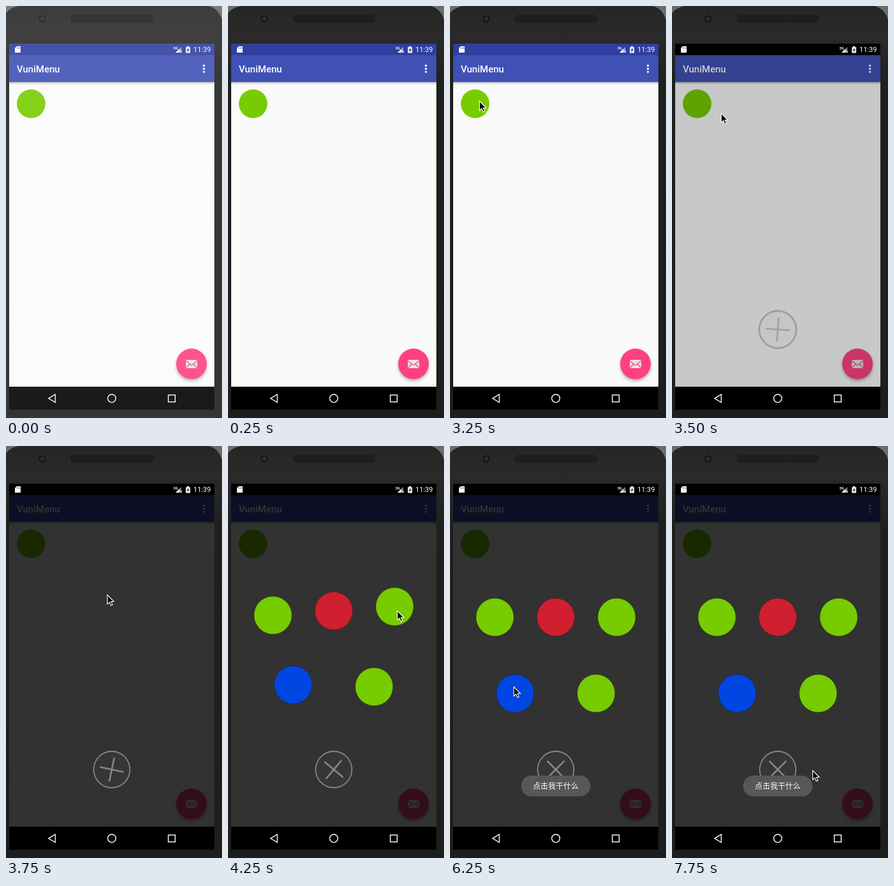
Write an HTML page that moves like this. It is 340 px wide and 645 px high and loops after 8000 ms.

```html
<!DOCTYPE html>
<html lang="en">
<head>
<meta charset="utf-8">
<title>Menu demo</title>
<style>
  html, body { margin: 0; width: 100%; height: 100%; overflow: hidden; background: #222; }
  svg { display: block; width: 340px; height: 645px; }
  text { font-family: Roboto, "Noto Sans CJK SC", "Noto Sans CJK", sans-serif; fill: #fff; }
</style>
</head>
<body>
<svg viewBox="0 0 340 645">
  <defs>
    <linearGradient id="body" x1="0" y1="0" x2="0" y2="1">
      <stop offset="0" stop-color="#262626"/>
      <stop offset=".07" stop-color="#2a2a2a"/>
      <stop offset=".2" stop-color="#1f1f1f"/>
      <stop offset="1" stop-color="#1e1e1e"/>
    </linearGradient>
    <linearGradient id="barShadow" x1="0" y1="0" x2="0" y2="1">
      <stop offset="0" stop-opacity=".26"/>
      <stop offset="1" stop-opacity="0"/>
    </linearGradient>
    <pattern id="mesh" width="3" height="3" patternUnits="userSpaceOnUse">
      <rect width="3" height="3" fill="#252525"/>
      <circle cx="1.5" cy="1.5" r=".9" fill="#0e0e0e"/>
    </pattern>
    <filter id="blur" x="-30%" y="-30%" width="160%" height="160%">
      <feGaussianBlur stdDeviation="2.4"/>
    </filter>
    <clipPath id="window"><rect x="5" y="77" width="323" height="519"/></clipPath>
  </defs>

  <!-- phone -->
  <rect width="340" height="645" fill="#6c6c6c"/>
  <path d="M0 11Q6 3 20 0H319Q335 4 340 22V645H0Z" fill="url(#body)"/>
  <circle cx="57" cy="20" r="6" fill="#191919"/>
  <circle cx="57" cy="20" r="3" fill="#2b3038"/>
  <rect x="102.500" y="14" width="129" height="11.500" rx="5.500" fill="url(#mesh)" stroke="#181818"/>

  <!-- app -->
  <rect x="5" y="59" width="323" height="573" fill="#fafafa"/>
  <rect id="status" x="5" y="59" width="323" height="18" fill="#303f9f"/>
  <rect x="5" y="77" width="323" height="42" fill="#3f51b5"/>
  <rect x="5" y="119" width="323" height="4" fill="url(#barShadow)"/>
  <text x="17" y="104" font-size="15" font-weight="500">VuniMenu</text>
  <g fill="#fff">
    <circle cx="311.500" cy="93.300" r="1.700"/>
    <circle cx="311.500" cy="98.200" r="1.700"/>
    <circle cx="311.500" cy="103.100" r="1.700"/>
  </g>
  <circle cx="39.500" cy="153" r="22.500" fill="#76cc00"/>
  <circle cx="292" cy="563" r="24" opacity=".3" filter="url(#blur)"/>
  <circle cx="292" cy="560.300" r="24" fill="#ff4081"/>
  <rect x="283" y="554" width="18" height="13" rx="1.300" fill="#e8e4e4"/>
  <path d="M283 555.500L292 562.500L301 555.500M283.500 566.500L289 560.500M300.500 566.500L295 560.500" fill="none" stroke="#ff4081" stroke-width="1.200"/>

  <!-- status icons -->
  <path d="M17 63H23V73H14V66Z" fill="#fff"/>
  <path d="M17.500 64.500V67M19.500 64.500V67M21.500 64.500V67" stroke="#303f9f" stroke-width=".8"/>
  <text x="263.500" y="67.500" font-size="5.500" font-weight="700">3G</text>
  <path d="M276 64V73H267Z" fill="#fff" opacity=".5"/>
  <path d="M273 67V73H267Z" fill="#fff"/>
  <path d="M274 70L277 73M277 70L274 73" stroke="#fff"/>
  <path d="M283 64.500H285V63H288V64.500H290V73.500H283Z" fill="#fff"/>
  <path d="M287.800 65L284 69.700H286L285.200 72.800L289.200 68H287Z" fill="#303f9f"/>
  <text x="295" y="72" font-size="11">11:39</text>

  <!-- navigation -->
  <rect x="5" y="596" width="323" height="36"/>
  <g fill="none" stroke="#fff" stroke-width="1.400">
    <path d="M67 614.300L77.500 608V620.600Z"/>
    <circle cx="166.500" cy="614.300" r="6.300"/>
    <rect x="255.500" y="609" width="10.800" height="10.800"/>
  </g>

  <rect id="dim" x="5" y="77" width="323" height="519"/>
  <g clip-path="url(#window)">
    <g id="items"></g>
    <g id="toggle" transform="translate(166.500 506.500)">
      <circle id="rim" r="29.700" fill="none" stroke="#333" stroke-width=".8" stroke-dasharray="2 1"/>
      <circle id="disc" r="28.500" stroke-width="1.800"/>
      <path id="cross" d="M-18 0H18M0-18V18" stroke-width="2.600" stroke-linecap="round"/>
    </g>
    <g id="toast">
      <rect x="112" y="516" width="109" height="32.500" rx="16.200" fill="#575757"/>
      <text x="130.500" y="537" font-size="12" fill="#eee">点击我干什么</text>
    </g>
  </g>
  <path id="pointer" d="M.5 0V14.500L3.900 11.400L6.100 16.700L8.600 15.600L6.400 10.500H10.800Z" stroke="#fff" stroke-width="1.100"/>
  <rect id="veil" width="340" height="645" fill="#fff" opacity=".1"/>
</svg>
<script>
const LOOP = 8000, TICK = 250;
const $ = id => document.getElementById(id);
const paint = (el, attrs) => {
  for (const k in attrs) el.setAttribute(k, attrs[k]);
};
const show = (id, alpha) => paint($(id), { opacity: alpha });

// [time, x, y], each held until the next one
const path = [
  [1000, 108, 122], [1250, 72, 143], [1500, 36, 157], [1750, 45, 149],
  [3250, 46, 149], [3500, 77, 168], [3750, 159, 233], [4000, 226, 258],
  [4250, 266, 258], [4500, 270, 262], [4750, 264, 268], [5000, 239, 294],
  [5250, 205, 333], [5500, 160, 365], [5750, 122, 378], [6000, 112, 380],
  [6250, 100, 377], [6500, 112, 385], [6750, 168, 392], [7000, 217, 387],
  [7250, 250, 436], [7500, 237, 474], [7750, 221, 508]
];
const turns = [[3500, 4], [3750, 12], [4000, 27], [4250, 40], [4500, 45]];
const at = (table, t) => table.filter(row => row[0] <= t).pop();

const green = "#76cc00";
const items = [
  [70.7, 268, green], [166.5, 268, "#d01f2e"], [262.4, 268, green],
  [102.6, 387.3, "#0046e2"], [230, 387.3, green]
].map(([cx, y, fill]) => {
  const el = document.createElementNS("http://www.w3.org/2000/svg", "circle");
  paint(el, { cx, r: 29.8, fill, stroke: "#1c1c1c", "stroke-width": .5 });
  $("items").append(el);
  return { el, y };
});

const backOut = p => 1 + 2.2 * (p - 1) ** 3 + 1.2 * (p - 1) ** 2;

function render(t) {
  const open = t >= 3500, dark = t >= 3750;
  show("veil", t < TICK ? .1 : 0);
  show("dim", dark ? .8 : open ? .2 : 0);
  paint($("status"), { fill: open ? "#000" : "#303f9f" });

  show("toggle", open ? 1 : 0);
  show("rim", dark ? 0 : 1);
  paint($("disc"), {
    fill: dark ? "#363636" : "#c6c6c6",
    stroke: dark ? "#868686" : "#a4a4a4"
  });
  const turn = at(turns, t);
  paint($("cross"), {
    stroke: dark ? "#868686" : "#a0a0a0",
    transform: `rotate(${turn ? turn[1] : 0})`
  });

  items.forEach(({ el, y }, i) => {
    const p = Math.min(1, Math.max(0, (t - 3750 - i * 50) / 550));
    paint(el, { cy: y + (640 - y) * (1 - backOut(p)), opacity: p > 0 ? 1 : 0 });
  });

  show("toast", t < 5000 ? 0 : t < 5250 ? .3 : 1);

  const spot = at(path, t);
  show("pointer", spot ? 1 : 0);
  if (spot) paint($("pointer"), { transform: `translate(${spot[1]} ${spot[2]})` });
}

const start = performance.now();
function frame() {
  const t = (performance.now() - start) % LOOP;
  render(Math.floor(t / TICK) * TICK);
  requestAnimationFrame(frame);
}
frame();
</script>
</body>
</html>
```
